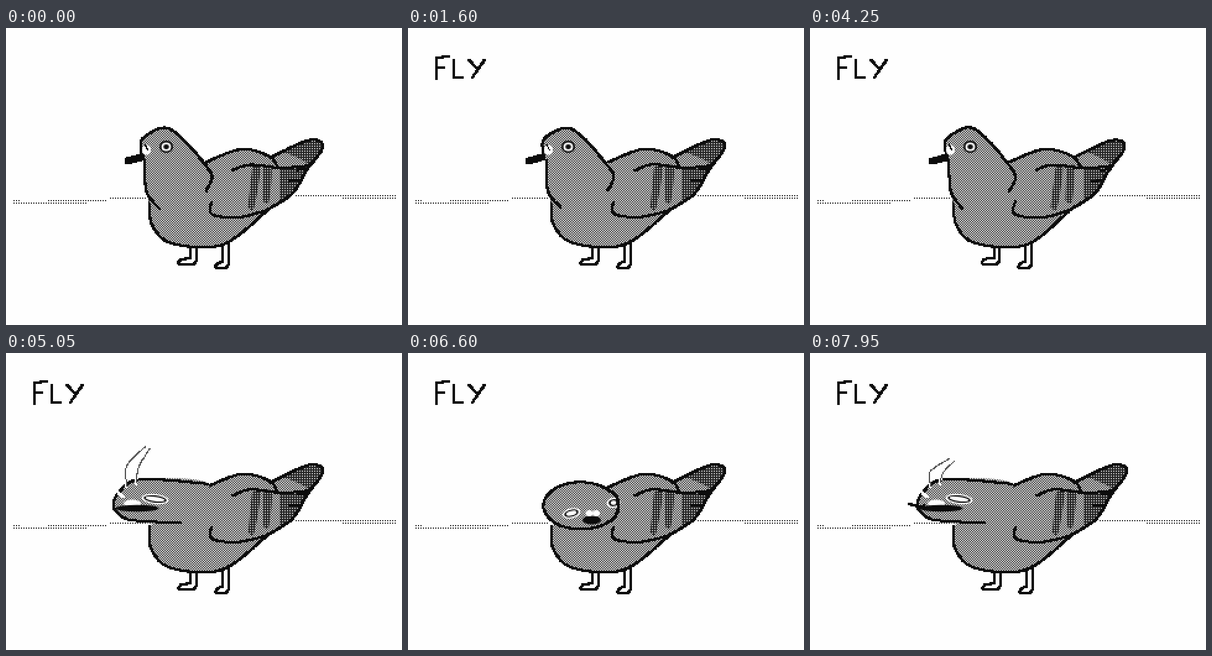
An HTML page with a canvas for the animation above (8 s loop, 640 by 480 pixels).

```html
<!DOCTYPE html>
<html lang="en">
<head>
<meta charset="utf-8">
<title>Pigeon</title>
<style>
html, body { margin: 0; width: 100%; height: 100%; overflow: hidden; background: #fefefe; }
canvas { display: block; width: 100%; height: 100%; image-rendering: pixelated; }
</style>
</head>
<body>
<canvas id="stage" width="320" height="240"></canvas>
<script>
const ctx = document.getElementById('stage').getContext('2d');
const LOOP = 8000, BOIL = 226.7, SHAKE = 450;
const INK = '#0c0c0c', PAPER = '#fefefe';
let variant = 0; // which of three slightly different drawings is showing

// Two-by-two pixel tiles: checkerboard for plumage, sparse dots for dark feathers.
function tile(cells) {
  const c = document.createElement('canvas');
  c.width = c.height = 2;
  const g = c.getContext('2d');
  cells.forEach((color, i) => { g.fillStyle = color; g.fillRect(i % 2, i >> 1, 1, 1); });
  return ctx.createPattern(c, 'repeat');
}
const GREY = tile(['#cccccc', '#505050', '#505050', '#cccccc']);
const DARK = tile(['#262626', '#262626', '#262626', '#b8b8b8']);

// The third drawing is a touch narrower; the last two wobble a little.
function wobble([x, y]) {
  const angle = x * 1.7 + y + variant * 2.3, amount = variant ? 0.6 : 0;
  const squeeze = variant === 2 ? 0.99 : 1;
  return [230 + (x - 230) * squeeze + amount * Math.sin(angle), y + amount * Math.cos(angle)];
}

// Smooth, densely sampled curve through a few key points given in stage pixels.
function curve(points) {
  const p = points.map(wobble), out = [];
  const at = i => p[Math.max(0, Math.min(p.length - 1, i))];
  for (let i = 0; i < p.length - 1; i++) {
    const [a, b, c, d] = [at(i - 1), at(i), at(i + 1), at(i + 2)];
    const steps = Math.ceil(Math.hypot(c[0] - b[0], c[1] - b[1])) || 1;
    for (let s = 0; s <= steps; s++) {
      const t = s / steps;
      out.push([0, 1].map(k => b[k] + t / 2 * (c[k] - a[k] +
        t * (2 * a[k] - 5 * b[k] + 4 * c[k] - d[k] + t * (3 * (b[k] - c[k]) + d[k] - a[k])))));
    }
  }
  return out;
}

function stroke(points, width = 2, color = INK) {
  ctx.fillStyle = color;
  for (const [x, y] of curve(points))
    ctx.fillRect(Math.round((x - width) / 2), Math.round((y - width) / 2), width, width);
}

function polyline(points) {
  points.slice(1).forEach((p, i) => stroke([points[i], p]));
}

function trace(points) {
  ctx.beginPath();
  for (const [x, y] of curve(points)) ctx.lineTo(x / 2, y / 2);
}

function fill(points, paint) {
  trace(points);
  ctx.fillStyle = paint;
  ctx.fill();
}

function oval(x, y, rx, ry, tilt = 0, paint = INK) {
  ctx.fillStyle = paint;
  ctx.beginPath();
  ctx.ellipse(x / 2, y / 2, rx / 2, ry / 2, tilt, 0, 7);
  ctx.fill();
}

// Nested ovals, alternating between the two colours from the rim inwards.
function eye(x, y, rx, ry, tilt, rim = INK) {
  for (let i = 0; i < 3; i++) {
    const paint = (i % 2 === 0) === (rim === INK) ? INK : PAPER;
    oval(x, y, rx - i * 3.2, ry - i * (rim === INK ? 3 : 2.2), tilt, paint);
  }
}

// A head is a crown line and a throat line with plumage between them.
function head(crown, throat) {
  fill([...crown, ...throat.slice().reverse()], GREY);
  stroke(crown);
  stroke(throat);
}

const BACK = [[323, 217], [380, 196], [425, 207], [439, 225]];
const BREAST = [[232, 280], [236, 318], [268, 348], [350, 350], [421, 296]];
const TAIL = [[430, 208], [490, 181], [512, 192], [486, 230], [462, 268], [420, 295]];
const WING = [[[366, 230], [395, 221], [445, 226], [492, 222]],
              [[332, 281], [333, 301], [375, 306], [420, 295]]];

function leg(x, sole, toe) {
  polyline([[x - 5, 352], [x - 5, sole - 10], [x - toe + 4, sole - 8], [x - toe, sole - 2],
    [x - toe + 4, sole], [x, sole], [x + 5, sole - 6], [x + 5, 350]]);
}

function body() {
  leg(303, 382, 25);
  leg(355, 388, 17);
  fill([...BACK, [470, 256], ...BREAST.slice().reverse()], GREY);
  fill(TAIL, GREY);

  ctx.save();
  trace(TAIL);
  ctx.clip();
  ctx.fillStyle = DARK;
  ctx.fillRect(221, 80, 50, 60);
  ctx.restore();
  fill([[434, 204], [450, 201], [488, 221], [436, 224]], GREY);

  for (let i = 0; i < 2; i++) {
    const x = 404 + 18 * i, lean = 8 - 6 * i, end = 290 - 10 * i;
    fill([[x - 6, 225], [x + 7, 225], [x + 5 - lean, end], [x - 5 - lean, end]], DARK);
  }
  [TAIL, BACK, BREAST, ...WING].forEach(line => stroke(line));
  for (let i = 0; i < 2; i++) stroke([[488 - 14 * i, 228 + 18 * i], [472 - 14 * i, 229 + 18 * i]]);
}

const poses = {
  upright() {
    head([[219, 203], [220, 180], [255, 161], [283, 177], [318, 216], [333, 240], [323, 263]],
      [[224, 213], [227, 264], [247, 291]]);
    oval(227, 197, 7, 8, 0, PAPER);
    stroke([[224, 188], [229, 197]], 1);
    stroke([[196, 215], [218, 209]], 5);
    eye(259, 192, 11, 10);
  },
  preening() {
    head([[233, 284], [236, 245], [280, 217], [345, 203], [363, 232], [355, 252]], [[233, 284], [238, 282]]);
    oval(340, 262, 13, 10);
    oval(342, 248, 9, 8, 0.4, PAPER);
    stroke([[342, 242], [343, 250]], 1);
    eye(322, 227, 12, 9, -0.3);
  },
  front() {
    const rim = Array.from({ length: 17 }, (_, i) =>
      [280 + 61 * Math.cos(i * Math.PI / 8), 247 + 38 * Math.sin(i * Math.PI / 8)]);
    head(rim, []);
    eye(264, 259, 15, 8, -0.25, PAPER);
    eye(332, 242, 11, 8, -0.15, PAPER);
    stroke(rim.slice(0, 2));
    stroke(rim.slice(-3));
    oval(297, 270, 15, 7);
    for (const x of [293, 304]) oval(x, 259, 6, 5, 0, PAPER);
  },
  // Mid-shake: beak and eye stretched sideways, with trails above the head.
  smeared(rise, stretched) {
    head([[175, 252], [178, 232], [215, 204], [327, 212]], [[175, 252], [200, 270], [282, 275]]);
    eye(241, 236, 22, 8, 0.12, PAPER);
    stroke([[181, 227], [189, 232]], 2, PAPER);
    oval(204, 243, 14, 6, 0, PAPER);
    oval(212, 251, 35, 5.5);
    if (stretched) stroke([[161, 244], [172, 247], [185, 247]]);
    for (let i = 0; i < 2; i++) {
      const trail = [[195 + 15 * i, 214 - 5 * i], [195 + 21 * i, 192 - rise / 2], [226 + 7 * i, 171 + 3 * i - rise]];
      stroke(trail.map(([x, y]) => [x, y + 2]), 2, PAPER);
      stroke(trail, 1, '#555');
    }
  }
};

function poseAt(t) {
  if (t < 2150) return 'upright';
  if (t < 3850) return 'preening';
  if (t < 4950) return 'upright';
  const swung = t % SHAKE < 150;
  return swung === (t < 6850) ? 'smeared' : 'front';
}

function ground() {
  const row = (x1, x2, y) => {
    ctx.fillStyle = '#383838';
    for (let x = x1; x < x2; x += 4) ctx.fillRect(x / 2, y / 2, 1, 1);
  };
  row(12, 22, 278);
  row(12, 130, 282);
  row(68, 162, 278);
  row(168, 228, 274);
  row(468, 630, 270);
  row(544, 630, 274);
}

function lettering() {
  polyline([[45, 81], [45, 48], [66, 46]]);
  stroke([[45, 64], [58, 63]]);
  polyline([[73, 52], [73, 80], [88, 79]]);
  stroke([[98, 51], [109, 63]]);
  stroke([[124, 51], [104, 80]]);
}

function draw(t) {
  ctx.fillStyle = PAPER;
  ctx.fillRect(0, 0, 320, 240);
  variant = 0;
  ground();
  if (t >= 1250) lettering();

  const phase = t / BOIL % 1;
  variant = phase < 0.05 || phase >= 0.75 ? 0 : phase < 0.4 ? 1 : 2;
  body();
  const late = t >= 6850, step = t % SHAKE;
  const rise = late ? Math.max(0, step - 300) * 0.28 : step * 0.2;
  poses[poseAt(t)](rise, late);
}

const start = performance.now();
function tick() {
  const t = (performance.now() - start) % LOOP;
  draw(Math.floor(t / 50) * 50);
  requestAnimationFrame(tick);
}
tick();
</script>
</body>
</html>
```
